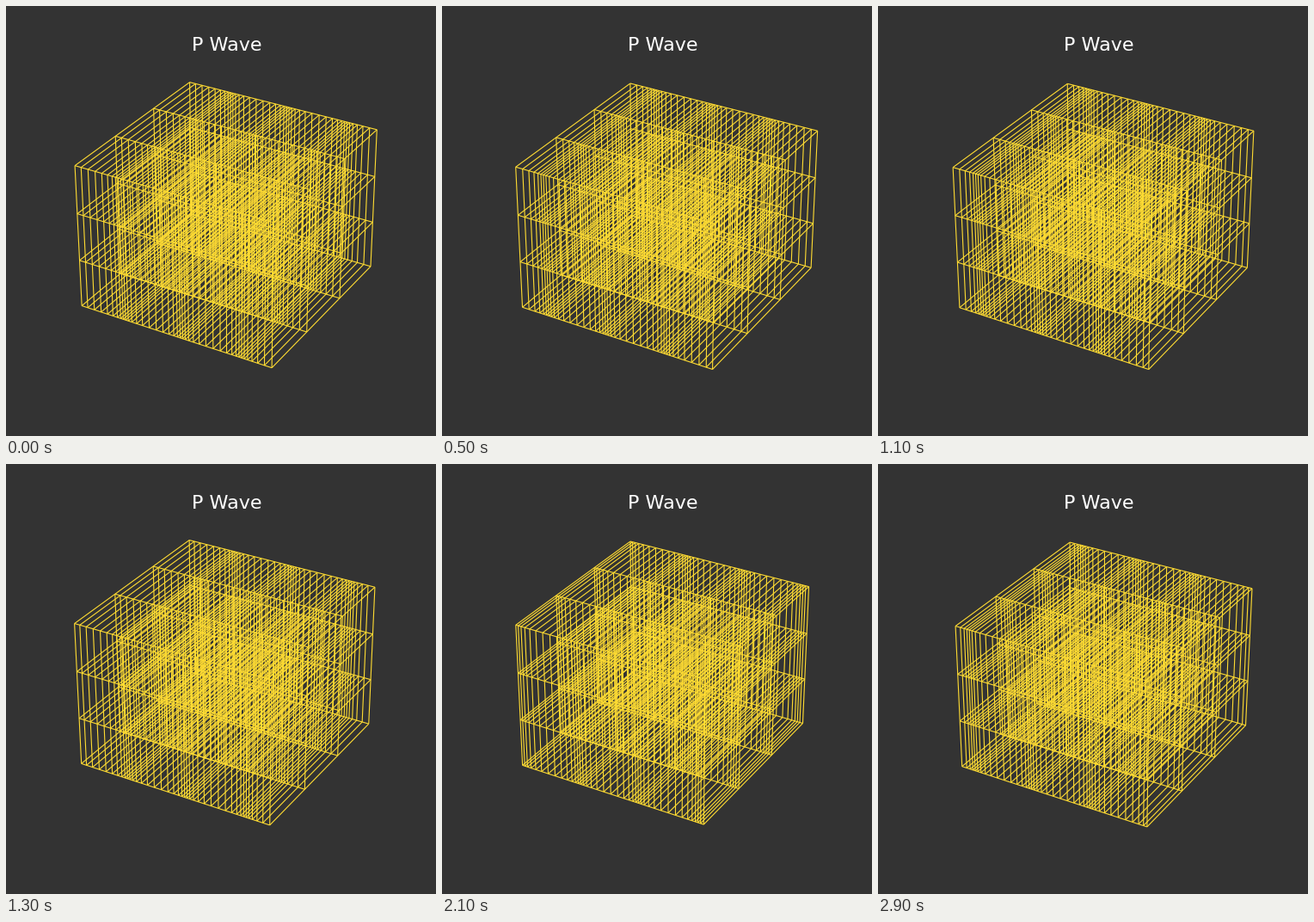
A matplotlib script that plays this animation: 500x500 px, repeating every 3000 ms.

```python
import numpy as np
import matplotlib.pyplot as plt
from matplotlib.animation import FuncAnimation
from mpl_toolkits.mplot3d.art3d import Line3DCollection

BACKGROUND = "#333333"
YELLOW = "#ffdc32"
HALF = 10
AMPLITUDE = 0.5
FRAMES = 30

rest = np.linspace(-HALF, HALF, 40)
levels = np.linspace(-HALF, HALF, 4)


def displaced(t):
    """Longitudinal wave travelling along +x."""
    return rest + AMPLITUDE * np.cos(rest - t + 1)


def grid_segments(t):
    xs = displaced(t)
    segments = []
    for a in levels:
        for x in xs:
            segments.append([(x, a, -HALF), (x, a, HALF)])
            segments.append([(x, -HALF, a), (x, HALF, a)])
        for b in levels:
            segments.append([(xs[0], a, b), (xs[-1], a, b)])
    return np.array(segments)


fig = plt.figure(figsize=(5, 5), dpi=100, facecolor=BACKGROUND)
ax = fig.add_subplot(projection="3d", facecolor=BACKGROUND)
ax.set(xlim=(-HALF, HALF), ylim=(-HALF, HALF), zlim=(-HALF, HALF))
ax.view_init(elev=30, azim=-60)
ax.set_axis_off()
ax.set_title("P Wave", color="white", fontsize=16)

grid = Line3DCollection(grid_segments(0), colors=YELLOW, linewidths=0.8)
ax.add_collection3d(grid)


def update(frame):
    grid.set_segments(grid_segments(frame))
    return (grid,)


anim = FuncAnimation(fig, update, frames=FRAMES, interval=100,
                     repeat=True, repeat_delay=0, blit=False)
plt.show()
```
